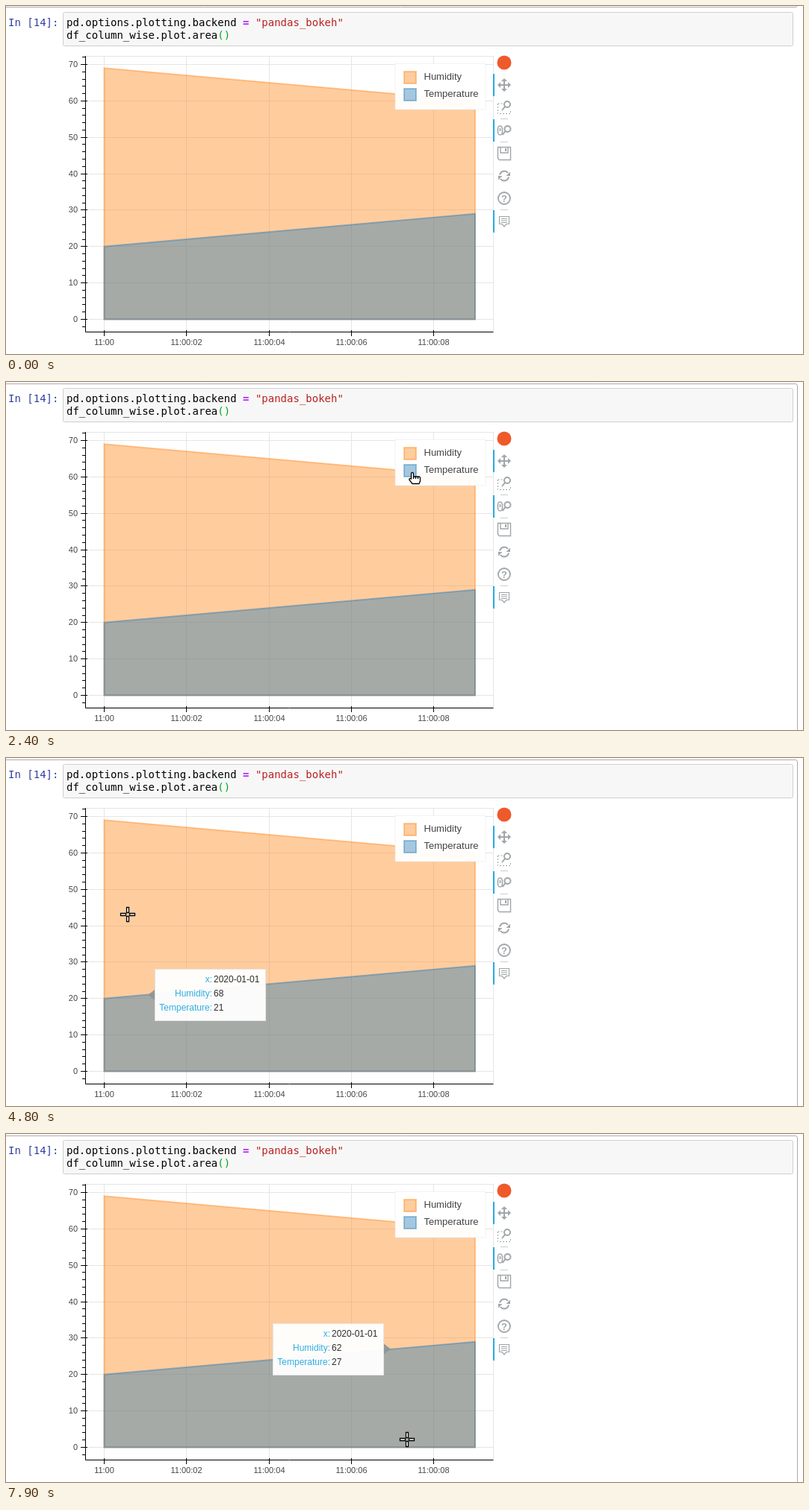
Write an HTML page with a canvas that moves like this. It is 1067x467 px and loops after 8 s.

```html
<!DOCTYPE html>
<html lang="en">
<head>
<meta charset="utf-8">
<title>Area plot</title>
<style>
html, body { margin: 0; width: 100%; height: 100%; overflow: hidden; background: #fff; }
canvas { display: block; }
</style>
</head>
<body>
<canvas id="stage" width="1067" height="467"></canvas>
<script>
const c = document.getElementById('stage').getContext('2d');
const SANS = '"Liberation Sans", Arial, sans-serif';
const MONO = '"DejaVu Sans Mono", monospace';
const ORANGE = '255,127,14', BLUE = '31,119,180', ACCENT = '#26aae1', ICON = '#a1a6a9';
const LOOP = 8000, STEP = 100;

// Pointer path: time, x, y
const PATH = [
  [400, 220, 8], [700, 420, 62], [800, 465, 85], [900, 510, 98], [1000, 542, 90],
  [2200, 542, 90], [2400, 544, 122], [3700, 544, 122], [3800, 470, 130], [3900, 350, 136],
  [4000, 245, 140], [4100, 203, 143], [4200, 188, 145], [4300, 188, 145], [4800, 163, 210],
  [5200, 143, 277], [5600, 174, 338], [6100, 185, 406], [6400, 243, 423], [6700, 325, 418],
  [7000, 370, 416], [7900, 537, 410]
];

const px = i => 131.5 + 55.17 * i;
const py = v => 420.5 - 4.886 * v;
const crisp = v => Math.floor(v) + .5;

function pointer(t) {
  if (t < PATH[0][0]) return null;
  const n = PATH.findIndex(p => p[0] > t);
  if (n < 0) return PATH[PATH.length - 1].slice(1);
  const [a, b] = [PATH[n - 1], PATH[n]], k = (t - a[0]) / (b[0] - a[0]);
  return [a[1] + (b[1] - a[1]) * k, a[2] + (b[2] - a[2]) * k];
}

function zone(p) {
  if (!p) return '';
  if (p[1] < 67) return 'text';
  return p[0] > 521 && p[1] < 139 ? 'legend' : 'plot';
}

function text(s, x, y, font, color, align = 'left') {
  c.font = font;
  c.fillStyle = color;
  c.textAlign = align;
  c.fillText(s, x, y);
}

function rect(x, y, w, h, color) {
  c.fillStyle = color;
  c.fillRect(x, y, w, h);
}

function line(color, ...pts) {
  c.strokeStyle = color;
  c.beginPath();
  pts.forEach(p => c.lineTo(...p));
  c.stroke();
}

function path(d, fill, stroke, width = 1) {
  const p = new Path2D(d);
  c.lineWidth = width;
  if (fill) { c.fillStyle = fill; c.fill(p); }
  if (stroke) { c.strokeStyle = stroke; c.stroke(p); }
  c.lineWidth = 1;
}

function at(x, y, draw) {
  c.save();
  c.translate(x, y);
  draw();
  c.restore();
}

function patch(rgb, pts) {
  const d = 'M' + pts.map(p => p.join()).join('L') + 'Z';
  path(d, `rgba(${rgb},.4)`, `rgba(${rgb},.4)`, 2);
}

function notebook(selected) {
  if (selected) path('M0 2.5H1057Q1059.5 2.5 1059.5 5V467', null, '#ababab');
  else path('M0 1.5H1057Q1059 1.5 1059.5 0', null, '#ababab');
  c.beginPath();
  c.roundRect(76.5, 8.5, 977, 45, 2);
  c.fillStyle = '#f7f7f7';
  c.fill();
  c.strokeStyle = '#cfcfcf';
  c.stroke();
  const font = '14px ' + MONO, cell = 8.43;
  const code = (s, col, y, color = '#000', f = font) => text(s, 81 + col * cell, y, f, color);
  text('In [14]:', 3, 27, font, '#303f9f');
  code('pd.options.plotting.backend', 0, 27);
  code('=', 28, 27, '#aa22ff', 'bold ' + font);
  code('"pandas_bokeh"', 30, 27, '#ba2121');
  code('df_column_wise.plot.area', 0, 44);
  code('()', 24, 44, '#00aa22');
}

function plot(showHum, showTemp) {
  c.strokeStyle = '#e5e5e5';
  c.strokeRect(106.5, 67.5, 546, 370);
  for (let i = 0; i < 10; i += 2) line('#e5e5e5', [crisp(px(i)), 67], [crisp(px(i)), 437]);
  for (let v = 0; v <= 70; v += 10) line('#e5e5e5', [106, crisp(py(v))], [652, crisp(py(v))]);

  const area = (rgb, a, b) =>
    patch(rgb, [[px(0), py(0)], [px(0), py(a)], [px(9), py(b)], [px(9), py(0)]]);
  if (showHum) area(ORANGE, 69, 60);
  if (showTemp) area(BLUE, 20, 29);

  line('#000', [106.5, 67], [106.5, 437.5], [652.5, 437.5]);
  for (let v = -2; v <= 72; v += 2) {
    const y = crisp(py(v)), major = v % 10 === 0;
    line('#000', [major ? 100 : 102, y], [major ? 109 : 106, y]);
    if (major) text(v, 96, y + 3.5, '11px ' + SANS, '#444', 'right');
  }
  for (let i = 0; i < 10; i += 2) {
    const x = crisp(px(i));
    line('#000', [x, 435], [x, 443]);
    text(i ? '11:00:0' + i : '11:00', x, 455, '11px ' + SANS, '#444', 'center');
  }

  rect(521, 77, 121, 62, 'rgba(255,255,255,.95)');
  c.strokeStyle = 'rgba(229,229,229,.5)';
  c.strokeRect(521, 77, 121, 62);
  key('Humidity', ORANGE, 88, 78, showHum);
  key('Temperature', BLUE, 111, 100, showTemp);
}

function key(label, rgb, y, width, active) {
  patch(rgb, [[533, y], [549, y], [549, y + 16], [533, y + 16]]);
  text(label, 559.5, y + 11, '13px ' + SANS, '#444');
  if (!active) rect(532, y - 1, width, 19, 'rgba(255,255,255,.7)');
}

function toolbar() {
  path('M657.5 76a9.5 9.5 0 1 0 19 0a9.5 9.5 0 1 0-19 0', '#ee5a2c');
  for (const y of [91, 152, 274]) rect(652, y, 2, 30, ACCENT);
  for (const y of [151, 182, 273]) rect(662, y, 10, 1, '#ccc');
  const stroke = (d, w = 2) => path(d, null, ICON, w);
  const lens = (x, y) => {
    stroke(`M${x - 4} ${y}a4 4 0 1 0 8 0a4 4 0 1 0-8 0M${x - 3} ${y + 3}l-4 5`);
  };
  at(667, 106, () => {
    stroke('M-6 0H6M0-6V6');
    path('M0-9l4 4h-8zM0 9l4-4h-8zM-9 0l4-4v8zM9 0l-4-4v8z', ICON);
  });
  at(667, 136, () => {
    c.setLineDash([2, 2]);
    stroke('M-8.5-5V8.5H8.5V3M-8.5-5H-2', 1);
    c.setLineDash([]);
    lens(4, -4);
  });
  at(667, 167, () => {
    stroke('M-8.5-2a3 4 0 0 1 6 0v4a3 4 0 0 1-6 0zM-5.5-3v4', 1.6);
    lens(4.5, -2);
  });
  at(667, 198, () => {
    stroke('M-8.5-8.5H8.5V8.5H-6.5L-8.5 6.5ZM-5-8V-1H5V-8', 1.4);
    rect(1, -7, 2, 4, ICON);
  });
  at(667, 228, () => {
    stroke('M-6-1.5A6.2 6.2 0 0 1 5-4M6 1.5A6.2 6.2 0 0 1-5 4');
    path('M8-5.5V0H2.5zM-8 5.5V0H-2.5z', ICON);
  });
  at(667, 258, () => {
    stroke('M-8 0a8 8 0 1 0 16 0a8 8 0 1 0-16 0', 1.8);
    text('?', 0, 4.8, 'bold 13px ' + SANS, ICON, 'center');
  });
  at(667, 289, () => {
    stroke('M-6.5-6.5H6.5V3.5H3L0 7L-3 3.5H-6.5ZM-4-3.5H4M-4-1H4M-4 1.5H4', 1.2);
  });
}

function tooltip(i) {
  const x = px(i), y = py(20 + i), side = x < 379 ? 1 : -1;
  const left = Math.round(side > 0 ? x + 12 : x - 160.5), top = Math.round(y - 35);
  c.globalAlpha = .95;
  const edge = side > 0 ? left : left + 149;
  path(`M${edge - 9 * side} ${y}L${edge} ${y - 7}V${y + 7}Z`, '#909599');
  rect(left, top, 149, 70, '#fff');
  c.strokeStyle = '#e5e5e5';
  c.strokeRect(left + .5, top + .5, 148, 69);
  [['x:', '2020-01-01'], ['Humidity:', 69 - i], ['Temperature:', 20 + i]].forEach(([name, value], n) => {
    const base = top + 18 + 19 * n;
    text(name, left + 77, base, '12px ' + SANS, ACCENT, 'right');
    text(value, left + 79, base, '12px ' + SANS, '#222');
  });
  c.globalAlpha = 1;
}

const CURSORS = {
  text: () => path('M-3.5-7.5H3.5M0-7.5V7.5M-3.5 7.5H3.5', null, '#000', 1.4),
  plot() {
    for (let n = 0; n < 4; n++) {
      path('M-1.5-2.5V-9.5H1.5V-2.5Z', '#fff', '#000', 1.3);
      c.rotate(Math.PI / 2);
    }
  },
  legend: () => path('M-1.5 8V1Q-1.5-.5 0-.5T1.5 1V5H9Q10.5 5 10.5 7V11L9 14.5H0L-4 9.5Q-4.5 7.5-3 7.3ZM1.5 5V8M4.5 5V8M7.5 5.5V8',
    '#fff', '#000', 1.3)
};

function draw(t) {
  c.clearRect(0, 0, 1067, 467);
  notebook(t >= 1300);
  plot(t < 1600 || t >= 2200, t < 3100 || t >= 3700);
  toolbar();
  const now = pointer(t), before = pointer(t - STEP);
  // The tooltip trails the pointer by one step
  if (zone(now) === 'plot' && zone(before) === 'plot') tooltip(Math.round((before[0] - px(0)) / 55.17));
  if (now) at(Math.round(now[0]), Math.round(now[1]), CURSORS[zone(now)]);
}

const start = performance.now();
function tick() {
  const t = (performance.now() - start) % LOOP;
  draw(Math.floor(t / STEP) * STEP);
  requestAnimationFrame(tick);
}
tick();
</script>
</body>
</html>
```
